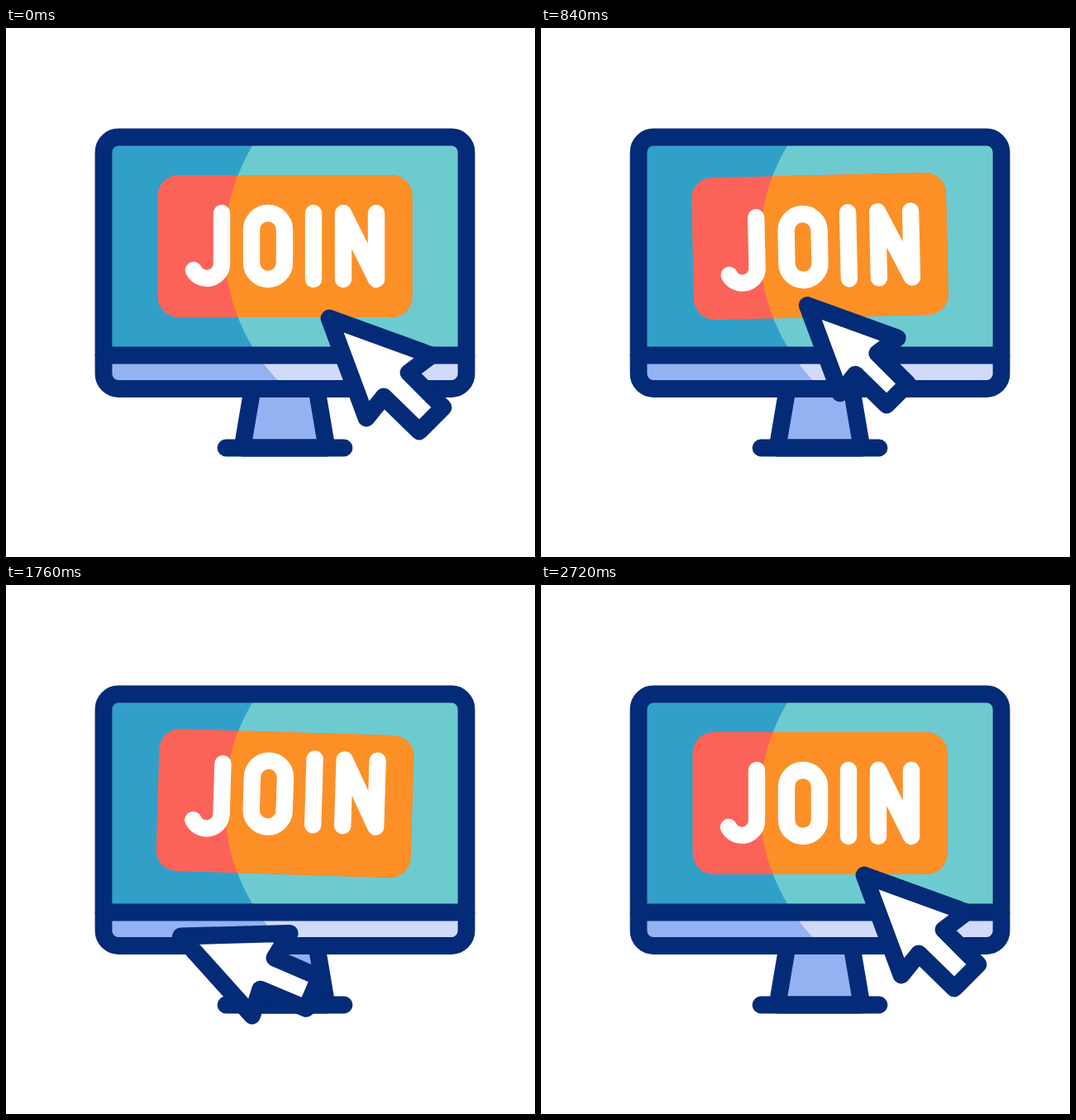
An HTML page for the animation above (3 s loop, 640 by 640 pixels).

```html
<!DOCTYPE html>
<html lang="en">
<head>
<meta charset="utf-8">
<title>Join</title>
<style>
html, body { margin: 0; height: 100%; overflow: hidden; background: #fff; }
svg { display: block; width: 100%; height: 100%; }
.line, #word { fill: none; stroke-linecap: round; stroke-linejoin: round; }
.line { stroke: #032b77; stroke-width: 20.8; }
#word { stroke: #fff; stroke-width: 20.4; }
#cursor { fill: #fff; vector-effect: non-scaling-stroke; }
#stand { fill: #94b1f2; }
</style>
</head>
<body>
<svg viewBox="0 0 640 640" role="img" aria-label="JOIN">
  <clipPath id="lit"><circle cx="501.500" cy="264" r="237"/></clipPath>

  <!-- monitor -->
  <path id="stand" class="line" d="M298 437L286 508H388L376 437"/>
  <path class="line" d="M266 508H409"/>
  <path fill="#31a0c9" d="M118 132H557V396H118z"/>
  <path fill="#94b1f2" d="M118 396H557V436H118z"/>
  <g clip-path="url(#lit)">
    <path fill="#6dcbd0" d="M118 132H557V396H118z"/>
    <path fill="#d2daf9" d="M118 396H557V436H118z"/>
  </g>
  <rect class="line" x="118" y="132" width="439" height="304.500" rx="18"/>
  <path class="line" d="M118 396H557"/>

  <!-- button -->
  <rect id="plate" x="183.500" y="178" width="308" height="172" rx="25" fill="#fc6358"/>
  <g clip-path="url(#lit)">
    <rect id="plateLit" x="183.500" y="178" width="308" height="172" rx="25" fill="#fc9027"/>
  </g>
  <g id="word">
    <path d="M261 224V286A18 18 0 0 1 227 293"/>
    <rect x="297" y="224" width="40" height="80" rx="20"/>
    <path d="M372 224V304"/>
    <path d="M408 304V224L448 304V224"/>
  </g>

  <path id="cursor" class="line" d="M0 0L124 45L96 66L138 108L109 137L66 95L45 121z"/>
</svg>
<script>
const LOOP = 3000, STAGGER = 95, BEAT = 410, WOBBLE_START = 695;
const $ = id => document.getElementById(id);
const turning = [$('plate'), $('plateLit'), $('word')];
const letters = [...$('word').children];
const cursor = $('cursor');

const ramp = (t, from, to) => Math.min(1, Math.max(0, (t - from) / (to - from)));
const ease = (t, from, to) => {
  const u = ramp(t, from, to);
  return u * u * (3 - 2 * u);
};
const pulse = (t, from, to) => Math.sin(Math.PI * ramp(t, from, to)) ** 2;

// Swings from rest to a, over to b, and back to rest, one beat each.
function wobble(t, a, b) {
  const step = n => ease(t, WOBBLE_START + n * BEAT, WOBBLE_START + (n + 1) * BEAT);
  return a * step(0) + (b - a) * step(1) - b * step(2);
}

// The cursor slides to the button, taps, dives below the screen and returns.
function cursorPose(t) {
  const slide = ramp(t, 220, 880), lift = ease(t, 220, 880);
  const dive = ease(t, 820, 1930), back = ease(t, 1930, 2720);
  const x = 391 - 69 * Math.sin(slide * Math.PI / 2) - 118 * dive + 187 * back;
  const y = 351 - 16 * lift ** 2 + 96 * dive - 80 * back ** 2;
  const lean = -23 * (dive - back);
  const size = 1 + 0.19 * pulse(t, 380, 680) - 0.13 * pulse(t, 640, 980);
  return `translate(${x} ${y}) rotate(${lean}) scale(${size})`;
}

function draw(t) {
  const turn = `rotate(${wobble(t, -4.6, 5)} 337.5 264)`;
  for (const el of turning) el.setAttribute('transform', turn);
  letters.forEach((el, i) =>
    el.setAttribute('transform', `translate(0 ${wobble(t - i * STAGGER, 12, -15.5)})`));
  cursor.setAttribute('transform', cursorPose(t));
}

const start = performance.now();
function tick() {
  draw((performance.now() - start) % LOOP);
  requestAnimationFrame(tick);
}
tick();
</script>
</body>
</html>
```
